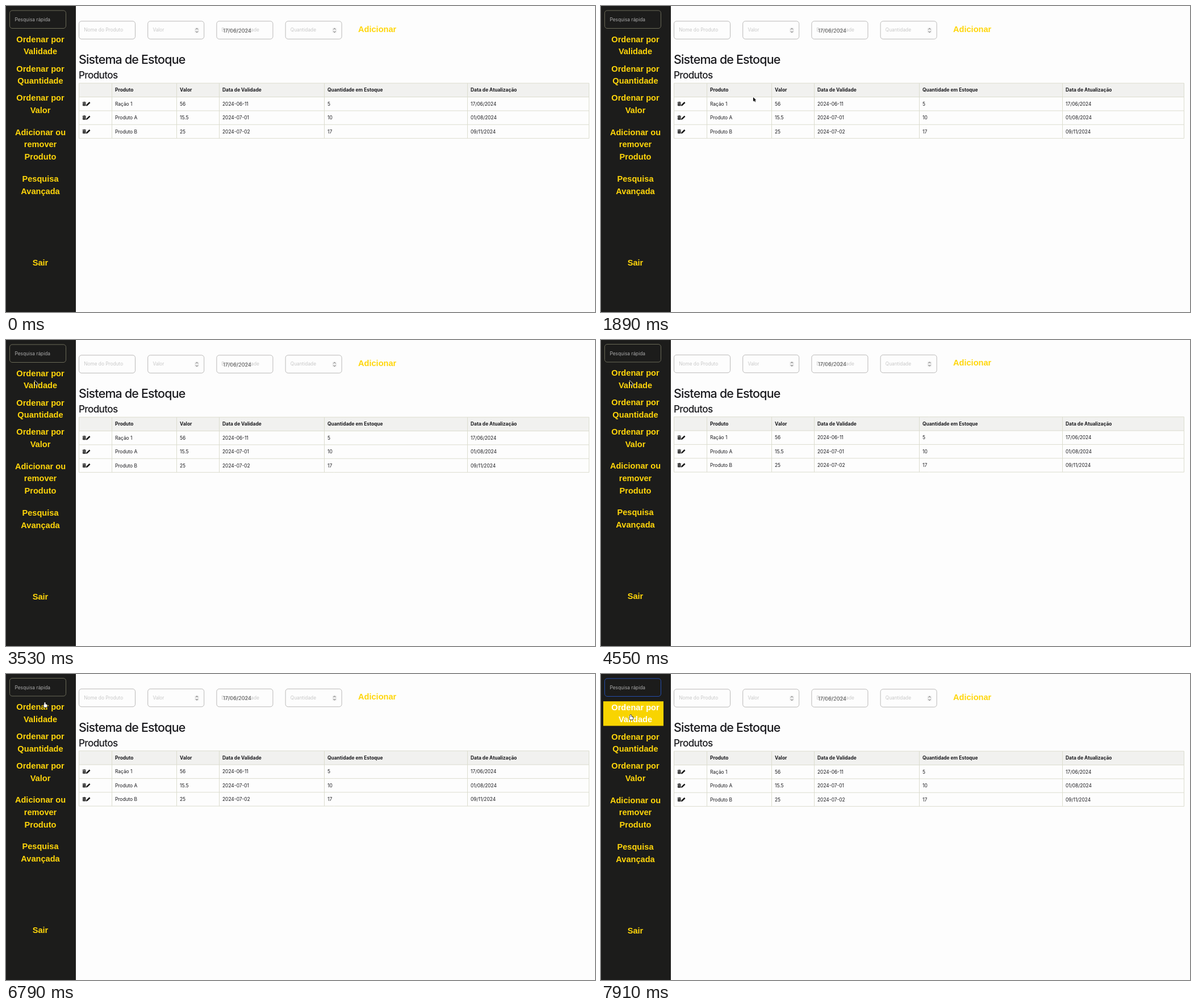
An HTML page with a canvas for the animation above (8 s loop, 1037 px wide and 540 px high).

```html
<!DOCTYPE html>
<html lang="pt">
<head>
<meta charset="utf-8">
<title>Sistema de Estoque</title>
<style>
html, body { margin: 0; width: 1037px; height: 540px; overflow: hidden; background: #fdfdfd; }
canvas { display: block; }
</style>
</head>
<body>
<canvas id="stage" width="1037" height="540"></canvas>
<script>
const ctx = document.getElementById('stage').getContext('2d');
const LOOP = 8000;
const INK = '#1a1a1e';
const YELLOW = [255, 214, 10];
const WHITE = [255, 255, 248];
const UI = 'Inter, sans-serif';
const HINT = '8.3px ' + UI;
const SIDE = 'bold 14.6px "Liberation Sans", Arial, sans-serif';
const LINE = 21.65;

const MENU = [
  'Ordenar por|Validade', 'Ordenar por|Quantidade', 'Ordenar por|Valor',
  'Adicionar ou|remover|Produto', 'Pesquisa|Avançada'
].map(label => label.split('|'));

const COLUMNS = [128.5, 186.5, 300.5, 375.5, 560.5, 812.5, 1026.5];
const ROWS = [
  ['Produto', 'Valor', 'Data de Validade', 'Quantidade em Estoque', 'Data de Atualização'],
  ['Ração 1', '56', '2024-06-11', '5', '17/06/2024'],
  ['Produto A', '15.5', '2024-07-01', '10', '01/08/2024'],
  ['Produto B', '25', '2024-07-02', '17', '09/11/2024']
];
const TOP = 136.2, ROW = 24.35;

// Pointer stops, eased in between
const STOPS = [
  { t: 1000, x: 335, y: 358 },
  { t: 1890, x: 268, y: 161 },
  { t: 3300, x: 308, y: 209 },
  { t: 3520, x: 51, y: 72 },
  { t: 5200, x: 51, y: 72 },
  { t: 5910, x: 158, y: 76 },
  { t: 6300, x: 70, y: 72 },
  { t: 7300, x: 66, y: 27 },
  { t: 7450, x: 76, y: 72 },
  { t: 7600, x: 52, y: 72 }
];

const mix = (a, b, k) => a + (b - a) * k;
const blend = (a, b, k) => `rgb(${a.map((v, i) => Math.round(mix(v, b[i], k)))})`;

// Smooth rise from 0 to 1
function ramp(t, start, length) {
  const k = Math.max(0, Math.min(1, (t - start) / length));
  return k * k * (3 - 2 * k);
}

function text(str, x, y, font, color, align = 'left', spacing = 0) {
  ctx.font = font;
  ctx.fillStyle = color;
  ctx.textAlign = align;
  ctx.letterSpacing = spacing + 'px';
  ctx.fillText(str, x, y);
}

function heading(str, y, size) {
  text(str, 128, y, `500 ${size}px ${UI}`, INK, 'left', -0.037 * size);
}

function line(x0, y0, x1, y1, color, width = 1) {
  ctx.strokeStyle = color;
  ctx.lineWidth = width;
  ctx.beginPath();
  ctx.moveTo(x0, y0);
  ctx.lineTo(x1, y1);
  ctx.stroke();
}

function box(x, y, w, h, r) {
  ctx.beginPath();
  ctx.roundRect(x, y, w, h, r);
}

function field(x, y, color) {
  box(x, y, 99, 31.5, 4.5);
  ctx.strokeStyle = color;
  ctx.lineWidth = 0.9;
  ctx.stroke();
}

function spinner(x, y) {
  box(x - 4, y - 5, 8, 10, 3);
  ctx.fillStyle = '#efefef';
  ctx.fill();
  for (const up of [-1, 1])
    for (const side of [-1, 1])
      line(x + 2 * side, y + 1.6 * up, x, y + 3.6 * up, '#444', 0.9);
}

function rowIcons(y) {
  const dark = '#151515';
  line(134.5, y - 2.6, 141, y - 2.6, dark, 1);
  line(136.4, y - 3.3, 139.2, y - 3.3, dark, 1);
  box(135, y - 1.6, 5.6, 5.2, 0.8);
  ctx.fillStyle = dark;
  ctx.fill();
  for (let x = 136.3; x < 140; x += 1.5) line(x, y - 0.8, x, y + 2.7, '#aaa', 0.6);
  line(141.3, y + 3.4, 143, y + 1.7, dark, 1.6);
  line(142.4, y + 2.3, 147.6, y - 2.7, dark, 2.5);
}

function sidebar(t) {
  ctx.fillStyle = '#1c1c1b';
  ctx.fillRect(0, -2, 123, 544);
  field(6.5, 8, blend([115, 114, 94], [38, 84, 190], ramp(t, 7340, 220)));
  text('Pesquisa rápida', 15.5, 27, HINT, '#adadad');

  const glance = ramp(t, 6180, 300) - ramp(t, 6420, 200);
  const hover = Math.max(glance, ramp(t, 7372, 300));
  ctx.fillStyle = '#f8d400';
  ctx.fillRect(4, 48.2, 106 * hover, 43.3);

  let y = 63.6;
  MENU.forEach((label, i) => {
    const color = blend(YELLOW, WHITE, i ? 0 : ramp(hover, 0.2, 0.8));
    for (const part of label) {
      text(part, 60.5, y, SIDE, color, 'center');
      y += LINE;
    }
    y += i < 2 ? 8.6 : 17.1;
  });
  text('Sair', 60.5, 457.8, SIDE, blend(YELLOW, WHITE, 0), 'center');
}

function form() {
  ['Nome do Produto', 'Valor', 'Data de Validade', 'Quantidade'].forEach((label, i) => {
    const x = 128.5 + i * 121.2;
    field(x, 26.8, '#b3b2b0');
    text(label, x + 8.7, 45, HINT, '#c8c8c8');
    if (i % 2) spinner(x + 86.3, 43);
  });
  text('17/06/2024', 382, 46.8, '9.2px ' + UI, '#555');
  text('Adicionar', 620, 45.7, SIDE, blend(YELLOW, WHITE, 0));
}

function table() {
  const left = COLUMNS[0], right = COLUMNS[6], grid = '#dcddcf';
  ctx.fillStyle = '#f1f1ef';
  ctx.fillRect(left, TOP, right - left, ROW);
  for (let r = 0; r <= ROWS.length; r++) line(left, TOP + r * ROW, right, TOP + r * ROW, grid);
  for (const x of COLUMNS) line(x, TOP, x, TOP + ROWS.length * ROW, grid);

  ROWS.forEach((row, r) => {
    const middle = TOP + (r + 0.5) * ROW;
    const font = (r ? '' : 'bold ') + '8.4px ' + UI;
    row.forEach((cell, c) => text(cell, COLUMNS[c + 1] + 5.5, middle + 3.1, font, INK));
    if (r) rowIcons(middle);
  });
}

function arrow() {
  ctx.beginPath();
  ctx.moveTo(0, 0);
  ctx.lineTo(0, 7.4);
  ctx.lineTo(1.8, 5.9);
  ctx.lineTo(3.2, 8.5);
  ctx.lineTo(4.2, 8);
  ctx.lineTo(3, 5.4);
  ctx.lineTo(5.2, 5.3);
  ctx.closePath();
  ctx.lineWidth = 1.1;
  ctx.strokeStyle = '#fff';
  ctx.stroke();
  ctx.fillStyle = '#080808';
  ctx.fill();
}

function hand() {
  ctx.beginPath();
  ctx.roundRect(-0.6, 0, 2, 6, 1);
  ctx.roundRect(-1.6, 3.4, 6, 5.2, 1.6);
  ctx.lineWidth = 1.6;
  ctx.strokeStyle = '#222';
  ctx.stroke();
  ctx.fillStyle = '#fff';
  ctx.fill();
}

function pointer(t) {
  if (t < STOPS[0].t) return;
  const i = STOPS.findLastIndex(stop => stop.t <= t);
  const from = STOPS[i], to = STOPS[i + 1] || from;
  const k = ramp(t, from.t, to.t - from.t || 1);
  const x = mix(from.x, to.x, k), y = mix(from.y, to.y, k);
  ctx.setTransform(1, 0, 0, 1, x, y);
  const overButton = t > 5910 && x < 110 && y > 47;
  if (overButton) hand();
  else arrow();
}

function draw(t) {
  ctx.setTransform(1, 0, 0, 1, 0, 0);
  ctx.fillStyle = '#fdfdfd';
  ctx.fillRect(0, 0, 1037, 540);
  // The page sits half a pixel higher while scrolled
  ctx.translate(0, t >= 4300 && t < 7600 ? -0.5 : 0);
  sidebar(t);
  form();
  heading('Sistema de Estoque', 102, 21.4);
  heading('Produtos', 128, 17.1);
  table();
  pointer(t);
}

const start = performance.now();
function tick() {
  draw((performance.now() - start) % LOOP);
  requestAnimationFrame(tick);
}
tick();
</script>
</body>
</html>
```
